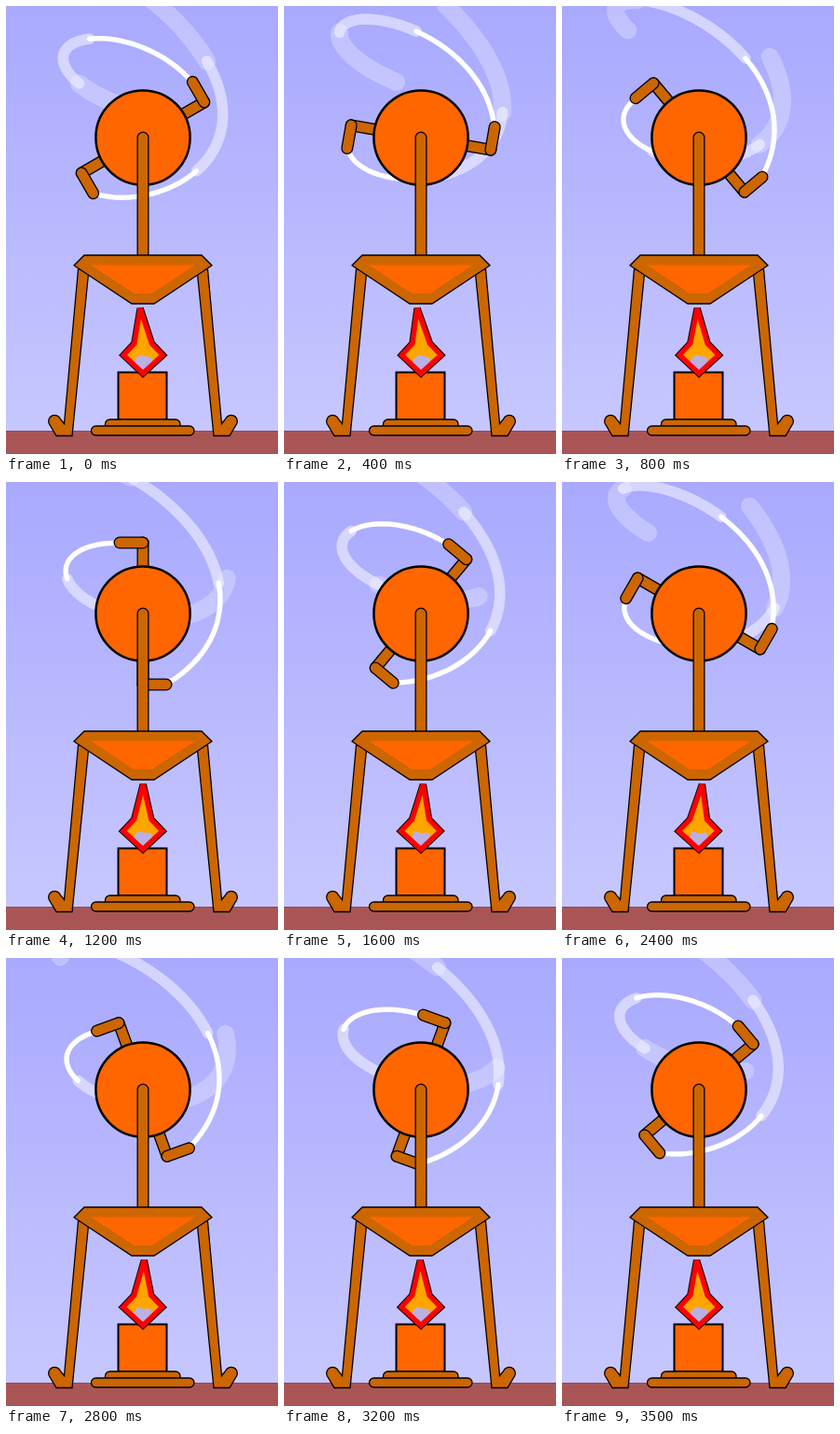
Write an HTML page with a canvas that moves like this. It is 292 px wide and 480 px high and loops after 3600 ms.

```html
<!DOCTYPE html>
<html lang="en">
<head>
<meta charset="utf-8">
<title>Steam engine</title>
<style>
html, body { margin: 0; width: 100%; height: 100%; overflow: hidden; background: #b4b4ff; }
canvas { display: block; width: 292px; height: 480px; }
</style>
</head>
<body>
<canvas id="stage" width="292" height="480"></canvas>
<script>
const ctx = document.getElementById('stage').getContext('2d');
const LOOP = 3600, STEP = 100;
const CX = 147, CY = 141;
const BROWN = '#cc6600', ORANGE = '#ff6600', INK = '#000';
const rad = deg => deg * Math.PI / 180;
const mix = (a, b, k) => a + (b - a) * k;

const sky = ctx.createLinearGradient(0, 0, 0, 456);
sky.addColorStop(0, '#a9a9ff');
sky.addColorStop(1, '#c7c7ff');

function paint(path, fill, width = 0) {
  ctx.fillStyle = fill;
  ctx.fill(path);
  if (width) line(path, width, INK);
}

function line(path, width, color) {
  ctx.lineJoin = 'miter';
  ctx.miterLimit = 3;
  ctx.lineWidth = width;
  ctx.strokeStyle = color;
  ctx.stroke(path);
}

function poly(points) {
  const path = new Path2D();
  points.forEach(([x, y]) => path.lineTo(x, y));
  path.closePath();
  return path;
}

function plate(x, y, w, h, r) {
  const path = new Path2D();
  path.roundRect(x, y, w, h, r);
  paint(path, BROWN, 1.3);
}

function rod(x1, y1, x2, y2) {
  const path = new Path2D();
  path.moveTo(x1, y1);
  path.lineTo(x2, y2);
  ctx.lineCap = 'round';
  line(path, 13, INK);
  line(path, 10.4, BROWN);
}

// Steam widens and fades as its age n grows.
const puffs = [
  [2, 2.88, 19, 'rgba(255,255,255,0.27)'],
  [1, 2, 11.5, 'rgba(255,255,255,0.5)'],
  [0, 1, 5.4, '#fff']
];

function steamAt(angle, n) {
  return [
    CX + (79.5 + 4 * n) * Math.cos(rad(angle - 18.4 - 85 * n)),
    CY + (79.5 + n) * Math.sin(rad(angle - 18.4 - 70 * n)) - 35 * n
  ];
}

function steam(angle) {
  ctx.lineCap = ctx.lineJoin = 'round';
  for (const [from, to, width, color] of puffs) {
    ctx.beginPath();
    for (let i = 0; i <= 30; i++) ctx.lineTo(...steamAt(angle, mix(from, to, i / 30)));
    ctx.lineWidth = width;
    ctx.strokeStyle = color;
    ctx.stroke();
  }
}

function arm(angle) {
  const c = Math.cos(rad(angle)), s = Math.sin(rad(angle));
  const ex = CX + 76 * c, ey = CY + 76 * s;
  rod(CX, CY, ex, ey);
  rod(ex, ey, ex + 25 * s, ey - 25 * c);
}

const leg = new Path2D('M77.5 282 L62.5 447.5 L58.3 442.3 A6.5 6.5 0 0 0 46.2 447.5 L54 460.5 L71 460.5 L89 282 Z');

function stand() {
  paint(leg, BROWN, 1.3);
  ctx.save();
  ctx.translate(2 * CX, 0);
  ctx.scale(-1, 1);
  paint(leg, BROWN, 1.3);
  ctx.restore();
  rod(CX, CY, CX, 275);
  paint(poly([[84, 267], [210, 267], [221, 278], [159, 319], [135, 319], [73, 278]]), BROWN, 1.3);
  paint(poly([[91, 277.5], [203, 277.5], [156.6, 308], [137.4, 308]]), ORANGE);
}

function burner() {
  const box = new Path2D();
  box.rect(120.5, 392.5, 52, 50.5);
  paint(box, ORANGE, 2);
  plate(106.5, 443, 80.5, 12, 5);
  plate(91.5, 450, 110.5, 10, 5);
}

function flame(t) {
  // Leans right until 2100 ms, then back.
  const p = (t - 300 + LOOP) % LOOP / (LOOP / 2);
  const k = p < 1 ? p : 2 - p;
  const sway = mix(0, -1.3, k);
  const body = poly([[mix(142.5, 152, k), 324], [156.5 + sway, 361.5], [168.5 + sway, 374],
    [147, 393.5], [126.5 + sway, 374], [138 + sway / 2, 361.5]]);
  line(body, 7.4, INK);
  paint(body, '#ffa500');
  paint(poly([[137, 381], [mix(144, 139, k), 374], [147, mix(374, 377, k)],
    [mix(157, 154, k), mix(377, 375, k)], [157, 381], [147, 391]]), '#bbb0e4');
  line(body, 5.4, '#ff0000');
}

function draw(t) {
  ctx.fillStyle = sky;
  ctx.fillRect(0, 0, 292, 480);
  ctx.fillStyle = '#aa5555';
  ctx.fillRect(0, 455, 292, 25);
  ctx.fillStyle = '#8f4a52';
  ctx.fillRect(0, 455, 292, 1);

  const angle = t / 10 - 30;
  const sides = [angle, angle + 180];
  sides.forEach(steam);
  sides.forEach(arm);
  const ball = new Path2D();
  ball.arc(CX, CY, 50.6, 0, 2 * Math.PI);
  paint(ball, ORANGE, 2.5);
  stand();
  burner();
  flame(t);
}

const start = performance.now();
function tick() {
  const t = (performance.now() - start) % LOOP;
  draw(Math.floor(t / STEP) * STEP);
  requestAnimationFrame(tick);
}
tick();
</script>
</body>
</html>
```
